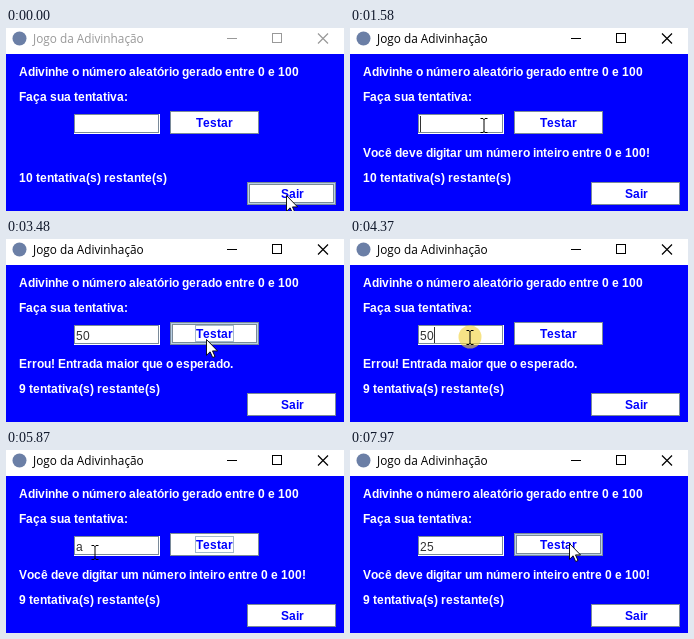
These frames come from a looping animation (338x183 px, 8 s). An HTML page:

```html
<!DOCTYPE html>
<html lang="pt-BR">
<head>
<meta charset="utf-8">
<title>Jogo da Adivinhação</title>
<style>
  html, body { margin: 0; width: 100%; height: 100%; overflow: hidden; background: #00f; }
  svg { display: block; width: 100vw; height: 100vh; }
  text { white-space: pre; }
  .label, .button text { font: bold 12px "Liberation Sans", Arial, sans-serif; fill: #fff; }
  .button text { fill: #00f; }
  .title { font: 11.8px "Open Sans", "Noto Sans", sans-serif; }
  .entry { font: 12px "Liberation Sans", Arial, sans-serif; fill: #333; }
  .line { fill: none; shape-rendering: crispEdges; }
  .edge { stroke: #7a8a99; }
  .light { stroke: #b8cfe5; }
</style>
</head>
<body>
<svg viewBox="0 0 338 183">
  <rect width="338" height="183" fill="#00f"/>
  <rect width="338" height="26" fill="#fff"/>
  <circle cx="13.5" cy="10.5" r="7" fill="#6b7fa6"/>
  <text id="title" class="title" x="27" y="15">Jogo da Adivinhação</text>
  <g id="controls" fill="none">
    <path class="line" d="M221 10.5h10M266.5 5.5h9v9h-9z"/>
    <path d="M312 5.5l10 10M322 5.5l-10 10" stroke-width="1.2"/>
  </g>

  <text class="label snap" x="13" y="48">Adivinhe o número aleatório gerado entre 0 e 100</text>
  <text class="label snap" x="13" y="73">Faça sua tentativa:</text>
  <text id="message" class="label" x="13" y="129"></text>
  <text id="left" class="label" x="13" y="154"></text>

  <rect x="68" y="86" width="86" height="20" fill="#fff"/>
  <rect class="line edge" x="68.5" y="86.5" width="84" height="18"/>
  <rect id="selection" x="70" y="88" height="16" fill="#b8cfe5"/>
  <text id="entry" class="entry" x="70" y="101"></text>
  <rect id="caret" y="88" width="1" height="16" fill="#333"/>

  <g id="test" class="button" transform="translate(164 83)">
    <rect class="face" width="89" height="23"/>
    <rect class="line edge" x=".5" y=".5" width="88" height="22"/>
    <g class="glow">
      <rect class="line light" x="1.5" y="1.5" width="86" height="20"/>
      <rect class="line edge" x="2.5" y="2.5" width="84" height="18"/>
    </g>
    <rect id="focus" class="line" x="25.5" y="3.5" width="38" height="16" stroke="#a3b8cc"/>
    <text class="snap" x="26" y="16">Testar</text>
  </g>
  <g id="quit" class="button" transform="translate(241 154)">
    <rect class="face" width="89" height="23"/>
    <rect class="line edge" x=".5" y=".5" width="88" height="22"/>
    <g class="glow">
      <rect class="line light" x="1.5" y="1.5" width="86" height="20"/>
      <rect class="line edge" x="2.5" y="2.5" width="84" height="18"/>
    </g>
    <text class="snap" x="34" y="16">Sair</text>
  </g>

  <g id="pointer">
    <circle id="halo" r="11.5" fill="#f0d23c" opacity=".62"/>
    <path id="arrow" d="M.5 .5v15.8l3.6-3.5 2.6 5.7 2.3-1-2.5-5.6h5z" fill="#fff" stroke="#000" stroke-width=".9"/>
    <path id="beam" d="M-3.5-6.5h2.5l1 1 1-1h2.5M0-6v13M-3.5 7.5h2.5l1-1 1 1h2.5" fill="none" stroke="#000"/>
  </g>
</svg>
<script>
const LOOP = 8000, SAMPLE = 68.2, BLINK = 500, SECRET = 30;
const $ = id => document.getElementById(id);
const show = (el, on) => el.setAttribute('visibility', on ? 'visible' : 'hidden');
const easeOut = k => 1 - (1 - k) ** 3;

const box = (x, y, w, h) => p => p[0] >= x && p[0] < x + w && p[1] >= y && p[1] < y + h;
const onField = box(68, 86, 86, 20);
const onTest = box(164, 83, 89, 23);
const onQuit = box(241, 154, 89, 23);

// What the player does: [time, action, details]
const script = [
  [60, move, 400, 226, 90], [540, press], [610, release],
  [880, move, 410, 134, 97], [1510, press], [1580, release],
  [2370, type, '5'], [2440, type, '0'],
  [2860, move, 410, 200, 100], [3340, press], [3420, release],
  [3820, move, 270, 120, 98], [4370, press],
  [4400, move, 110, 3, 92], [4440, select], [4720, release], [4800, type, 'a'],
  [4905, move, 70, 62, 92],
  [5000, move, 320, 206, 98], [5400, press], [5530, release],
  [5660, move, 200, 89, 102], [6130, press],
  [6380, move, 380, 2, 97], [6540, select], [6770, release],
  [7310, type, '2'], [7440, type, '5'],
  [7840, move, 138, 219, 93]
];

function move(s, at, span, x, y) {
  // The pointer is seen at a fixed sampling rate.
  const now = Math.floor((s.now + 20) / SAMPLE) * SAMPLE;
  const k = easeOut(Math.min(1, Math.max(0, (now - at) / span)));
  s.pos = [x, y].map((v, i) => Math.round(s.pos[i] + (v - s.pos[i]) * k));
}

function press(s, at) {
  s.active = s.down = true;
  s.focus = onField(s.pos) ? 'field' : 'test';
  s.marked = false;
  s.input = at;
}

function release(s) {
  s.down = false;
  if (s.focus !== 'test') return;
  const guess = parseInt(s.text);
  if (isNaN(guess)) {
    s.message = 'Você deve digitar um número inteiro entre 0 e 100!';
  } else {
    s.tries--;
    s.message = `Errou! Entrada ${guess > SECRET ? 'maior' : 'menor'} que o esperado.`;
  }
}

function select(s, at) {
  s.marked = true;
  s.input = at;
}

function type(s, at, key) {
  s.text = s.marked ? key : s.text + key;
  s.marked = false;
  s.input = at;
}

function stateAt(now) {
  const s = { now, pos: [280, 167], text: '', message: '', tries: 10, input: 0 };
  for (const [at, act, ...details] of script) {
    if (at <= now) act(s, at, ...details);
  }
  return s;
}

// Sets text with every advance rounded to whole pixels, as the toolkit does.
const pen = document.createElement('canvas').getContext('2d');
function setText(el, str) {
  if (el.dataset.set === str) return;
  el.dataset.set = el.textContent = str;
  pen.font = getComputedStyle(el).font;
  let x = parseFloat(el.getAttribute('x'));
  const stops = [x];
  for (const c of str) stops.push(x += Math.round(pen.measureText(c).width));
  el.setAttribute('x', stops.join(' '));
}

function drawButton(id, over, down) {
  const part = name => $(id).querySelector(name);
  part('.face').setAttribute('fill', over && down ? '#b8cfe5' : '#fff');
  show(part('.glow'), over && !down);
}

function render(t) {
  const s = stateAt(t);
  const inField = s.focus === 'field';
  const isBeam = onField(s.pos) || (s.down && inField);
  const ink = s.active ? '#000' : '#999';
  const width = s.text.length * 7;

  $('title').setAttribute('fill', ink);
  $('controls').setAttribute('stroke', ink);
  setText($('message'), s.message);
  setText($('left'), `${s.tries} tentativa(s) restante(s)`);

  setText($('entry'), s.text);
  $('selection').setAttribute('width', width);
  show($('selection'), s.marked);
  $('caret').setAttribute('x', 70 + (s.marked ? 0 : width));
  show($('caret'), inField && (t - s.input) % (2 * BLINK) < BLINK);

  drawButton('test', onTest(s.pos), s.down);
  drawButton('quit', onQuit(s.pos), s.down);
  show($('focus'), s.focus === 'test');

  $('pointer').setAttribute('transform', `translate(${s.pos})`);
  show($('halo'), s.down);
  show($('arrow'), !isBeam);
  show($('beam'), isBeam);
}

document.querySelectorAll('.snap').forEach(el => setText(el, el.textContent));
const start = performance.now();
function tick() {
  render((performance.now() - start) % LOOP);
  requestAnimationFrame(tick);
}
tick();
</script>
</body>
</html>
```
